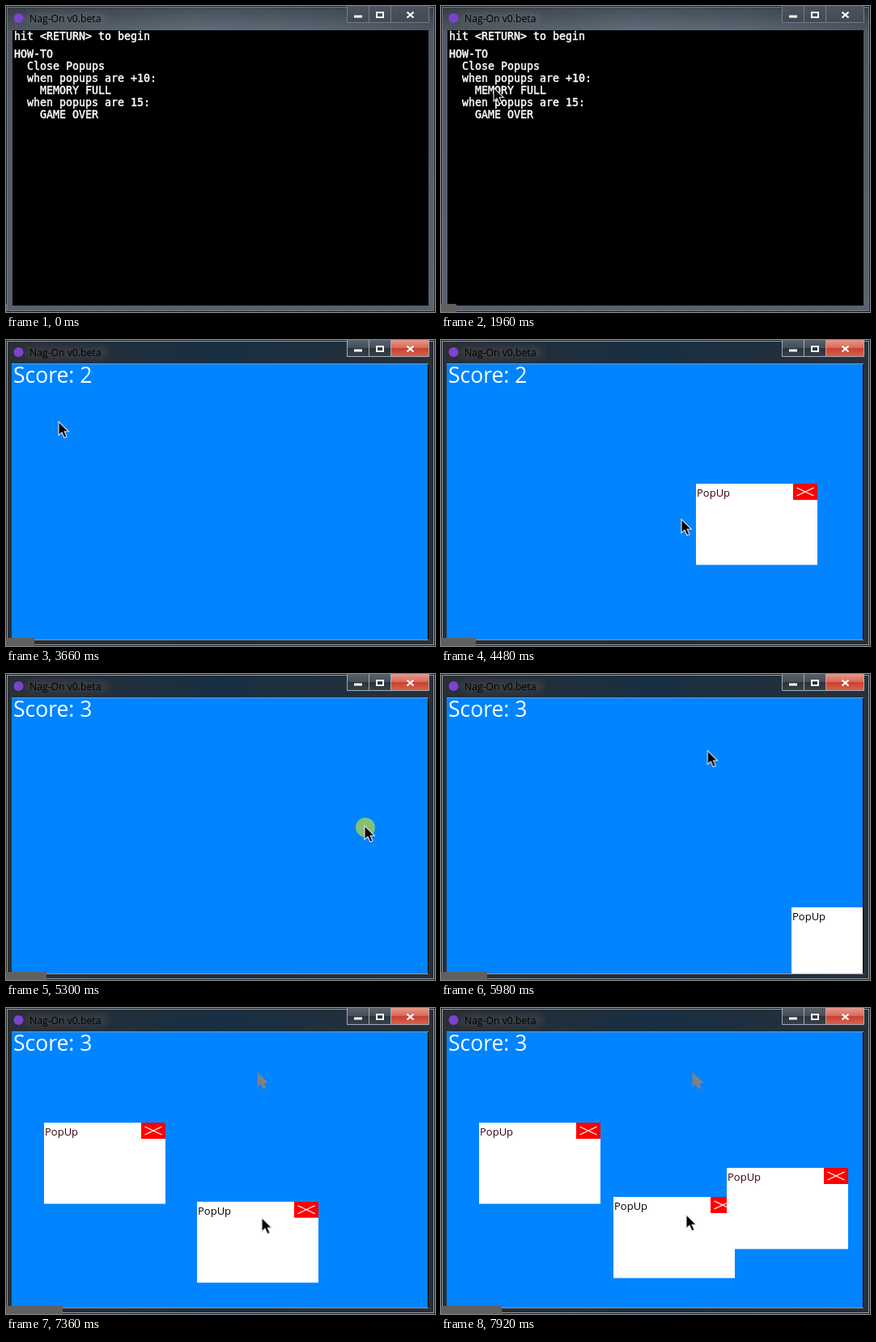
An HTML page that plays this animation: 530x379 px, repeating every 7990 ms.

```html
<!DOCTYPE html>
<html lang="en">
<head>
<meta charset="utf-8">
<title>Nag-On</title>
<style>
  html, body { margin: 0; width: 100%; height: 100%; overflow: hidden; background: #000; }
  svg { display: block; width: 530px; height: 379px; }
  text { white-space: pre; }
  .title { font: 12.2px "Open Sans", "Noto Sans", sans-serif; }
  .mono { font: 13.29px "DejaVu Sans Mono", monospace; fill: #fff; stroke: #fff; stroke-width: .45px; }
  .score { font: 26.5px "Open Sans", "Noto Sans", sans-serif; fill: #fff; }
  .label { font: 13px "Open Sans", "Noto Sans", sans-serif; }

  .anim { animation: 7990ms linear infinite; }
  .cut { animation-timing-function: step-end; }

  .focus { animation-name: focus; }
  .game { animation-name: game; }
  .two { animation-name: two; }
  .three { animation-name: three; }
  .pop1 { animation-name: pop1; }
  .pop2 { animation-name: pop2; }
  .drag { animation-name: drag; }
  .pop3 { animation-name: pop3; }
  .pop4 { animation-name: pop4; }
  .trail { animation-name: trail; }
  .click { animation-name: click; }
  .mouse { animation-name: mouse; }
  .bar { animation-name: bar; animation-timing-function: steps(75, jump-start); }

  @keyframes focus { 0%, 36.3% { opacity: 0 } 38.9%, 100% { opacity: 1 } }
  @keyframes game { 0% { visibility: hidden } 45.06%, 100% { visibility: visible } }
  @keyframes two { 0% { opacity: 1 } 65.46%, 100% { opacity: 0 } }
  @keyframes three { 0% { opacity: 0 } 65.46%, 100% { opacity: 1 } }
  @keyframes pop1 { 0% { opacity: 0 } 54.07% { opacity: 1 } 65.46%, 100% { opacity: 0 } }
  @keyframes pop2 { 0% { opacity: 0 } 67.96%, 100% { opacity: 1 } }
  @keyframes pop3 { 0% { opacity: 0 } 81.83%, 100% { opacity: 1 } }
  @keyframes pop4 { 0% { opacity: 0 } 95.74%, 100% { opacity: 1 } }
  @keyframes trail { 0% { opacity: 0 } 76.2%, 100% { opacity: 1 } }
  @keyframes click { 0% { opacity: 0 } 64.58% { opacity: 1 } 67.96%, 100% { opacity: 0 } }
  @keyframes bar { from { transform: scaleX(0) } to { transform: scaleX(75) } }
  @keyframes drag {
    0%, 85.7% { transform: translate(433px, 289px); animation-timing-function: ease-in-out }
    94%, 100% { transform: translate(213px, 234px) }
  }
  @keyframes mouse {
    0%, 2.2% { transform: translate(424px, 385px) }
    6.5% { transform: translate(345px, 275px); animation-timing-function: ease-out }
    11.5%, 12.2% { transform: translate(118px, 163px); animation-timing-function: ease-out }
    19%, 50.6% { transform: translate(65px, 101px); animation-timing-function: ease-in-out }
    56%, 57.6% { transform: translate(297px, 222px); animation-timing-function: ease-in-out }
    61.3%, 71% { transform: translate(443px, 188px); animation-timing-function: ease-in-out }
    76.2%, 77.4% { transform: translate(311px, 80px); animation-timing-function: ease-in-out }
    81.8%, 82.7% { transform: translate(489px, 290px) }
    84.5%, 85.7% { transform: translate(513px, 309px); animation-timing-function: ease-in-out }
    94% { transform: translate(293px, 254px) }
    96%, 100% { transform: translate(303px, 256px) }
  }
</style>
</head>
<body>
<svg viewBox="0 0 530 379">
  <defs>
    <linearGradient id="idle" x2="0" y2="1">
      <stop offset="0" stop-color="#505963"/>
      <stop offset="1" stop-color="#5a636d"/>
    </linearGradient>
    <linearGradient id="glass">
      <stop offset="0" stop-color="#4d555e"/>
      <stop offset=".45" stop-color="#5f6e7b"/>
      <stop offset=".7" stop-color="#596875"/>
      <stop offset="1" stop-color="#4c555f"/>
    </linearGradient>
    <linearGradient id="shade" x2="0" y2="1">
      <stop offset="0" stop-opacity=".28"/>
      <stop offset="1" stop-opacity="0"/>
    </linearGradient>
    <linearGradient id="active">
      <stop offset="0" stop-color="#2a2f36"/>
      <stop offset=".5" stop-color="#182f42"/>
      <stop offset="1" stop-color="#27303a"/>
    </linearGradient>
    <linearGradient id="flat" x2="0" y2="1">
      <stop offset="0" stop-color="#4c545f"/>
      <stop offset="1" stop-color="#414954"/>
    </linearGradient>
    <linearGradient id="dark" x2="0" y2="1">
      <stop offset="0" stop-color="#59626b"/>
      <stop offset=".48" stop-color="#454e57"/>
      <stop offset=".5" stop-color="#2b333b"/>
      <stop offset="1" stop-color="#39424b"/>
    </linearGradient>
    <linearGradient id="red" x2="0" y2="1">
      <stop offset="0" stop-color="#e59a8c"/>
      <stop offset=".48" stop-color="#d9685a"/>
      <stop offset=".5" stop-color="#c8402f"/>
      <stop offset="1" stop-color="#d8604c"/>
    </linearGradient>
    <filter id="blur" x="-20%" y="-80%" width="140%" height="260%">
      <feGaussianBlur stdDeviation="4"/>
    </filter>
    <clipPath id="client"><rect x="7" y="30" width="514" height="341"/></clipPath>
    <path id="arrow" d="M0 0V17L4 13.4L7 20L10 18.7L7.2 12.3H12.3Z"/>
    <path id="buttons" d="M421.5 0V20.5H522.5V0M448.5 0V20M475.5 0V20"/>
    <g id="glyphs" fill="none">
      <path d="M430 13H440" stroke-width="3"/>
      <rect x="458" y="8" width="8" height="6" stroke-width="2"/>
      <path d="M495.5 7.5L503.5 14.5M503.5 7.5L495.5 14.5" stroke-width="2.2"/>
    </g>
    <g id="pop">
      <rect width="150" height="100.5" fill="#fff"/>
      <rect x="120" width="30" height="20" fill="#f00"/>
      <path d="M124.5 5L145.5 15M145.5 5L124.5 15" stroke="#fff" stroke-width="1.3"/>
      <text class="label" x="1" y="16" fill="currentColor">PopUp</text>
    </g>
  </defs>

  <!-- window frame, inactive then active -->
  <rect width="530" height="379" fill="#15191d"/>
  <rect x="1.5" y="1.5" width="527" height="376" fill="url(#idle)" stroke="#727c86"/>
  <rect x="2" y="2" width="526" height="28" fill="url(#glass)"/>
  <rect x="2" y="2" width="526" height="28" fill="url(#shade)"/>
  <rect x="24" y="9" width="100" height="12" rx="6" fill="#6e7780" opacity=".4" filter="url(#blur)"/>
  <use href="#buttons" fill="url(#flat)" stroke="#747d87"/>
  <g class="anim focus">
    <rect x="1.5" y="1.5" width="527" height="376" fill="url(#active)" stroke="#98a2ab"/>
    <rect x="24" y="9" width="102" height="13" rx="6" fill="#45474a" opacity=".7" filter="url(#blur)"/>
    <path d="M421 0H523V21H421Z" fill="url(#dark)"/>
    <path d="M476 0H522V20H476Z" fill="url(#red)"/>
    <use href="#buttons" fill="none" stroke="#a3abb3"/>
    <rect x="7.5" y="29.5" width="514" height="342" fill="none" stroke="#8c959d"/>
  </g>
  <use href="#glyphs" stroke="#fff"/>
  <circle cx="15.5" cy="15" r="6" fill="#7c43cf"/>
  <text class="title" x="29" y="20">Nag-On v0.beta</text>

  <!-- start screen -->
  <rect x="8" y="30" width="514" height="341" fill="#000"/>
  <g class="mono">
    <text x="10" y="42">hit &lt;RETURN&gt; to begin</text>
    <text x="10" y="64">HOW-TO</text>
    <text x="26" y="79">Close Popups</text>
    <text x="26" y="94">when popups are +10:</text>
    <text x="42" y="109">MEMORY FULL</text>
    <text x="26" y="124">when popups are 15:</text>
    <text x="42" y="139">GAME OVER</text>
  </g>

  <!-- game -->
  <g class="anim cut game" clip-path="url(#client)" color="#3a0008">
    <rect x="7" y="30" width="514" height="341" fill="#0084ff"/>
    <text class="score anim cut two" x="9" y="53">Score: 2</text>
    <text class="score anim cut three" x="9" y="53">Score: 3</text>
    <g class="anim cut trail"><use href="#arrow" x="311" y="80" fill="#7d8187" stroke="#7d8187"/></g>
    <g class="anim cut pop1"><use href="#pop" x="315" y="178"/></g>
    <g class="anim cut pop2"><g class="anim drag"><use href="#pop" color="#000"/></g></g>
    <g class="anim cut pop3"><use href="#pop" x="47" y="142"/></g>
    <g class="anim cut pop4"><use href="#pop" x="353" y="198"/></g>
  </g>

  <circle class="anim cut click" cx="444" cy="190" r="12" fill="#82c076"/>
  <g class="anim mouse"><use href="#arrow" fill="#0c0004" stroke="#e4e4e4" stroke-width="1.1"/></g>
  <rect class="anim bar" y="369" width="1" height="10" fill="#606060"/>
</svg>
</body>
</html>
```
